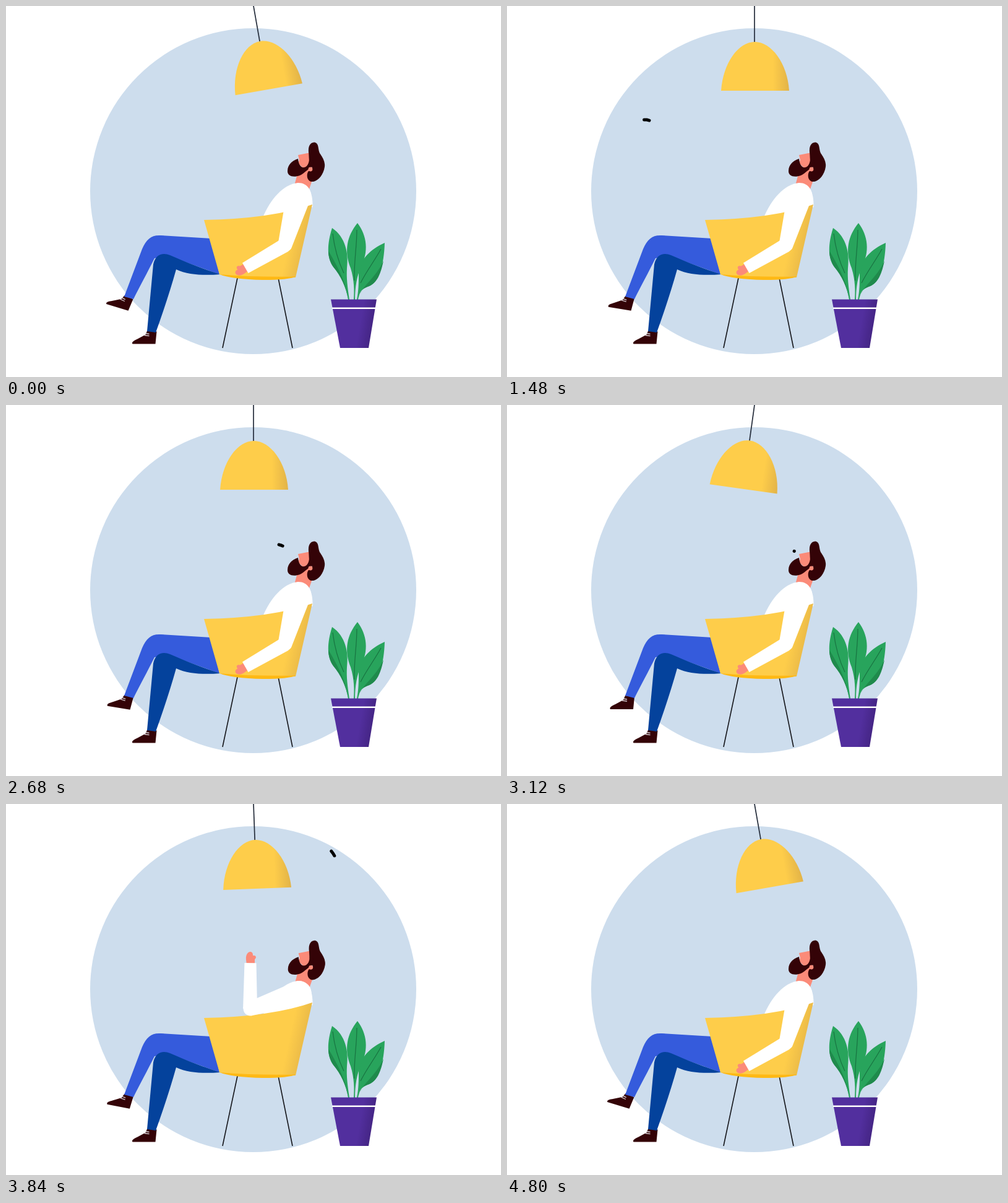
Recreate the animation shown at these times as an HTML page. Size 800x600 px, loop 4.84 s.

```html
<!DOCTYPE html>
<html lang="en">
<head>
<meta charset="utf-8">
<title>Fly and chair</title>
<style>
html, body { margin: 0; width: 100%; height: 100%; overflow: hidden; background: #fff; }
svg { display: block; width: 100%; height: 100%; }
</style>
</head>
<body>
<svg viewBox="0 0 800 600">
  <defs>
    <linearGradient id="lampFill">
      <stop offset=".76" stop-color="#fecd4a"/>
      <stop offset="1" stop-color="#e2b348"/>
    </linearGradient>
    <linearGradient id="seatFill" gradientUnits="userSpaceOnUse" x1="458" y1="378" x2="486" y2="384">
      <stop offset="0" stop-color="#fecd4a"/>
      <stop offset="1" stop-color="#e8b848"/>
    </linearGradient>
    <linearGradient id="potFill" gradientUnits="userSpaceOnUse" x1="572" y1="514" x2="595" y2="518">
      <stop offset="0" stop-color="#522f9e"/>
      <stop offset="1" stop-color="#432482"/>
    </linearGradient>
    <g id="shoe">
      <path d="M191 470L206 472L204 492H167C165 489 169 487 175 484L188 477Z" fill="#340307"/>
      <path d="M186 478L194 479M188 475L194 476" stroke="#d8cfd4" stroke-width="1.3"/>
    </g>
  </defs>

  <circle cx="399.5" cy="299.5" r="263.5" fill="#cddded"/>

  <g id="lamp">
    <path d="M400 -10V59" stroke="#242c3a" stroke-width="1.7"/>
    <path d="M346 137C349 92 374 58 400.5 58C427 58 453 92 456 137Z" fill="url(#lampFill)"/>
  </g>

  <g id="plant">
    <g fill="#28a45c">
      <path d="M527 359C519 385 518 406 529 422C541 436 550 455 553 475H555C552 455 550 440 551 424C554 400 549 374 527 359Z"/>
      <path d="M612 383C590 393 571 410 570 432C570 448 570 460 567 475H569C572 460 576 457 587 453C603 446 611 418 612 383Z"/>
      <path d="M568 351C551 372 546 396 557 424C563 444 563 460 562 475H564C564 455 567 437 574 421C586 398 584 372 568 351Z"/>
    </g>
    <path d="M521 396C521 406 524 415 529 422C541 436 550 455 553 474C551 452 538 424 521 396ZM610 412C606 432 600 448 587 453C576 457 573 460 570 472C574 453 598 440 610 412Z" fill="#1f8a4c"/>
    <path d="M528 368C531 393 537 413 546 432M567 362C567 390 562 415 563 444M606 393C595 413 583 428 573 448" fill="none" stroke="#187341" stroke-width="1.2"/>
    <path d="M525 474.5H599L586 553H540Z" fill="url(#potFill)"/>
    <path d="M527 488.8H597.5" stroke="#fff" stroke-width="2.6"/>
  </g>

  <path d="M374 440L350 553M440 440L463 553" stroke="#14151a" stroke-width="1.6"/>

  <use href="#shoe" id="foot"/>
  <use href="#shoe" x="37.5" y="54.5"/>
  <path d="M332 376L250 371C235 370 227 377 220 393L191 470L206 474C217 452 228 432 240 408L262 404L345 434Z" fill="#355bdc"/>
  <path d="M346 434C320 436 294 435 275 426C266 458 255 492 242 528L228 526L238 418C241 402 253 398 265 403C292 415 316 424 346 434Z" fill="#04429c"/>

  <g id="head">
    <path d="M472 268L466 290L490 296L497 276L488 262ZM472 241L492 237V262H480L472 254L474 249Z" fill="#fb8b79"/>
    <path d="M489 236C488 224 494 220 499 220.5C506 222 504 232 507 238C512 245 516 252 515 260C513 274 503 285 493 284C486 282 485 272 489 267C495 267 497 262 493 259C489 252 490 245 489 236Z" fill="#340307"/>
    <path d="M455 267C455 256 463 250 472 247C473 257 477 262 482 261C487 260 490 254 490 247L497 250L495 260C487 264 483 270 475 274C464 278 455 275 455 267Z" fill="#340307"/>
    <circle cx="492" cy="264" r="3.4" fill="#fb8b79"/>
  </g>

  <path d="M415 342C427 313 448 288 472 286C488 286 496 299 495.5 325L440 350Z" fill="#fff"/>
  <path d="M320 346Q430 344 495 321L468 439Q405 443 345 434Z" fill="url(#seatFill)"/>
  <path d="M345 434Q405 439 468 437.5Q458 443 415 443Q365 442 345 434Z" fill="#ffb914"/>

  <g id="fore">
    <path d="M71 -6L79 -7C87 -8 93 -4 92 1C91 4 88 4 86 4C87 9 83 10.5 80 7L71 7Z" fill="#fb8b79"/>
    <path d="M0 -11.5L74 -9.5V9.5L0 11.5Z" fill="#fff"/>
  </g>
  <path id="upper" d="M0 -19L82.5 -11.5A11.500 11.500 0 0 1 82.5 11.5L0 21A20 20 0 0 1 0 -19Z" fill="#fff"/>

  <path id="fly" fill="none" stroke="#000" stroke-width="5" stroke-linecap="round" stroke-linejoin="round"/>
</svg>
<script>
const LOOP = 4840, STEP = 40, SWING = 1200, RAD = Math.PI / 180;
const [lamp, foot, head, upper, fore, fly] =
  ['lamp', 'foot', 'head', 'upper', 'fore', 'fly'].map(id => document.getElementById(id));

const mix = (a, b, k) => a + (b - a) * k;
const ease = (t, a, b) => {
  const k = Math.min(1, Math.max(0, (t - a) / (b - a)));
  return k * k * (3 - 2 * k);
};
const place = (node, x, y, angle) =>
  node.setAttribute('transform', `translate(${x} ${y}) rotate(${angle})`);
const spin = (node, angle, x, y) =>
  node.setAttribute('transform', `rotate(${angle} ${x} ${y})`);

// Stops of the fly; a leg that ends with "loop" adds one circle of that radius, tilted by "turn".
const stops = [
  { t: 120, x: -25, y: 252 },
  { t: 760, x: 201, y: 187 },
  { t: 1480, x: 226, y: 184, loop: 38, turn: -4 },
  { t: 2680, x: 445, y: 227, loop: 30, turn: 22 },
  { t: 2800, x: 466, y: 237 },
  { t: 3340, x: 463, y: 236 },
  { t: 3440, x: 467, y: 215 },
  { t: 3600, x: 480, y: 160 },
  { t: 4160, x: 528, y: 113, loop: 34, turn: 12 },
  { t: 4800, x: 812, y: 90 }
];

function flyAt(t) {
  const i = Math.max(1, stops.findIndex(s => s.t >= t));
  const a = stops[i - 1], b = stops[i], { loop = 0, turn = 0 } = b;
  const k = (t - a.t) / (b.t - a.t), phi = 2 * Math.PI * k;
  const u = loop * Math.sin(phi), v = loop * (Math.cos(phi) - 1);
  const c = Math.cos(turn * RAD), s = Math.sin(turn * RAD);
  return [mix(a.x, b.x, k) + u * c - v * s, mix(a.y, b.y, k) + u * s + v * c];
}

function drawFly(t) {
  const on = t > stops[0].t && t < 4800;
  fly.setAttribute('d', on ? 'M' + [-12, 0, 12].map(d => flyAt(t + d)).join('L') : '');
}

function drawArm(k) {
  const x = 474, y = 307, len = 83, a = mix(106.2, 187.5, k);
  place(upper, x, y, a);
  place(fore, x + len * Math.cos(a * RAD), y + len * Math.sin(a * RAD), mix(150, 322, k));
}

function draw(t) {
  const s = t % SWING;
  spin(lamp, -10 + 20 * (ease(s, 0, 560) - ease(s, 600, SWING)), 400, 0);
  spin(foot, 17 * (1 - ease(s, 0, 600) + ease(s, 750, SWING)), 198, 471);

  const swat = ease(t, 3160, 3400) - ease(t, 3520, 4400);
  drawArm(swat);
  place(head, swat, swat / 2, 0);
  drawFly(t);
}

const start = performance.now();
function tick() {
  const t = (performance.now() - start) % LOOP;
  draw(Math.floor(t / STEP) * STEP);
  requestAnimationFrame(tick);
}
tick();
</script>
</body>
</html>
```
